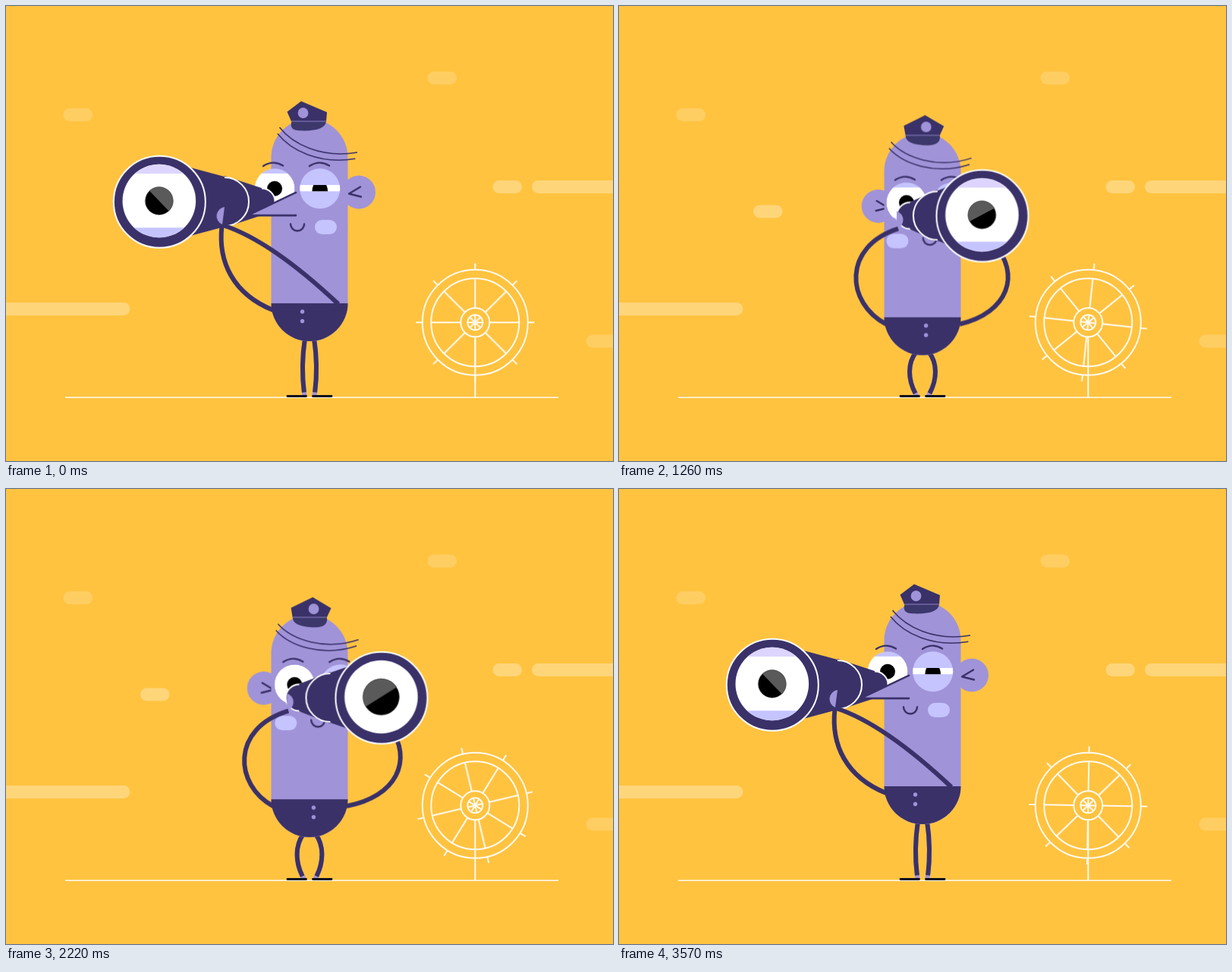
Animation, 800 px wide and 600 px high, one loop 3.6 s. Source, as an HTML page without scripts:

```html
<!DOCTYPE html>
<html lang="en">
<head>
<meta charset="utf-8">
<title>Lookout</title>
<style>
html, body { margin: 0; width: 100%; height: 100%; overflow: hidden; background: #ffc340; }
svg { display: block; width: 100vw; height: 100vh; }

:root { --ease: cubic-bezier(.333, 0, .667, 1); }
.skin { fill: #a093d8; }
.dark { fill: #3a3169; }
.lilac { fill: #c5c4ff; }
.pale { fill: #ddd5ff; }
.white { fill: #fff; }
.line { fill: none; stroke: #3a3169; stroke-width: 2.4; }
.hair { stroke-width: 1.5; }
.limb { fill: none; stroke: #3a3169; stroke-width: 6; }
.rim { fill: #3a3169; stroke: #fff; stroke-width: 2; }
.chalk { fill: none; stroke: #fffaf0; stroke-width: 2; }

/* Head turn: left at 0, right at half time, then back */
.turn { animation: turn 3.6s var(--ease) infinite; }
.morph { d: var(--a); animation: morph 3.6s var(--ease) infinite; }
.sweep { d: var(--a); animation: sweep 3.6s infinite; }
.carry { animation: carry 3.6s infinite; }
.glint { animation: glint 3.6s var(--ease) infinite; }
@keyframes turn {
  0%, 98.9%, 100% { transform: translateX(0); }
  48.9%, 49.7% { transform: translateX(var(--dx)); }
}
@keyframes morph {
  0%, 98.9%, 100% { d: var(--a); }
  48.9%, 49.7% { d: var(--b); }
}
/* The two halves of the same ease, through a middle pose */
@keyframes sweep {
  0%, 98.9%, 100% { d: var(--a); animation-timing-function: cubic-bezier(.333, 0, .667, .5); }
  24.45%, 74.3% { d: var(--m); animation-timing-function: cubic-bezier(.333, .5, .667, 1); }
  48.9%, 49.7% { d: var(--b); animation-timing-function: cubic-bezier(.333, 0, .667, .5); }
}
@keyframes carry {
  0%, 98.9%, 100% { transform: var(--a); animation-timing-function: cubic-bezier(.333, 0, .667, .5); }
  24.45%, 74.3% { transform: var(--m); animation-timing-function: cubic-bezier(.333, .5, .667, 1); }
  48.9%, 49.7% { transform: var(--b); animation-timing-function: cubic-bezier(.333, 0, .667, .5); }
}
@keyframes glint {
  0%, 98.9%, 100% { transform: rotate(46deg); }
  48.9%, 49.7% { transform: rotate(-46deg); }
}

/* Knee bend, twice per loop */
.dip { animation: dip 1.8s -10ms var(--ease) infinite; }
.leg { d: var(--a); animation: bend 1.8s -10ms var(--ease) infinite; }
@keyframes dip { 0%, 97.8%, 100% { transform: translateY(0); } 47% { transform: translateY(33.4px); } }
@keyframes bend { 0%, 97.8%, 100% { d: var(--a); } 47% { d: var(--b); } }

/* Wide-eyed moment on the right */
.lid { animation: lid 3.6s var(--ease) infinite; }
.pupil { animation: pupil 3.6s var(--ease) infinite; }
@keyframes lid {
  0%, 45%, 80%, 100% { transform: translateY(0); }
  55%, 72% { transform: translateY(var(--open)); }
}
@keyframes pupil {
  0%, 45%, 85%, 100% { transform: scale(1); }
  55%, 77% { transform: scale(1.3); }
}

.wheel { animation: wheel 3.6s var(--ease) infinite; }
@keyframes wheel { to { transform: rotate(181deg); } }

.nose {
  fill: #a093d8; stroke: #3a3169; stroke-width: 2.4; stroke-linejoin: round; stroke-linecap: round;
  --a: path("M382 246L319 276L382 276");
  --m: path("M408 246L424 276L408 276");
  --b: path("M418 246L480 276L418 276");
}
.near-left { animation: near-left 3.6s step-end infinite; }
.near-right { animation: near-right 3.6s step-end infinite; }
@keyframes near-left { 0%, 84% { opacity: 1; } 15.5% { opacity: 0; } }
@keyframes near-right { 0%, 85% { opacity: 0; } 14% { opacity: 1; } }
</style>
</head>
<body>
<svg viewBox="0 0 800 600">
  <defs>
    <clipPath id="body-clip"><rect x="349.500" y="149" width="101" height="293" rx="50.500"/></clipPath>
    <clipPath id="lens-clip"><circle r="48.300"/></clipPath>
    <clipPath id="eye-clip"><circle r="26.500"/></clipPath>
    <path id="spoke" d="M0-78V-69.500M0-58V-19M0-10V10M0 19V58M0 69.500V78"/>
    <path id="brow" class="line" d="M0 211Q13 202.500 26 210.500" stroke-linecap="round"/>
    <rect id="cheek" class="lilac" x="-14.500" y="282" width="29" height="19" rx="9.500"/>
    <g id="ear">
      <circle class="skin" r="22"/>
      <path class="line" d="M2-7L-13 2L3 6" stroke-linecap="round" stroke-linejoin="round"/>
    </g>
  </defs>

  <rect width="800" height="600" fill="#ffc340"/>
  <g class="white" opacity=".18">
    <rect x="75.500" y="135" width="38.500" height="17" rx="8.500"/>
    <rect x="555.500" y="86.500" width="38.500" height="17" rx="8.500"/>
    <rect x="764.500" y="433.500" width="60" height="17" rx="8.500"/>
  </g>
  <g class="white" opacity=".3">
    <rect x="641.500" y="230" width="38.500" height="17" rx="8.500"/>
    <rect x="693" y="230" width="130" height="17" rx="8.500"/>
    <rect x="177" y="262.500" width="38.500" height="17" rx="8.500"/>
    <rect x="-20" y="391" width="183.500" height="17" rx="8.500"/>
  </g>

  <g class="chalk">
    <path d="M78 516.200H728" style="stroke-width:1.500"/>
    <path d="M618.300 436V516"/>
    <g transform="translate(618.300 417.300)">
      <circle r="69.500"/><circle r="58"/><circle r="19"/><circle r="10"/>
      <g class="wheel">
        <use href="#spoke"/>
        <use href="#spoke" transform="rotate(45)"/>
        <use href="#spoke" transform="rotate(90)"/>
        <use href="#spoke" transform="rotate(135)"/>
      </g>
    </g>
  </g>

  <!-- Legs: skin shows at the ankle -->
  <g class="limb">
    <g style='--a:path("M394 438C390 465 390 490 393.500 514");--b:path("M390 471C371 477 373 498 391.500 514")'>
      <path class="leg" stroke="#a093d8"/>
      <path class="leg" pathLength="100" stroke-dasharray="94 100"/>
    </g>
    <g style='--a:path("M406 438C410 465 410 490 406.500 514");--b:path("M410 471C429 477 427 498 408.500 514")'>
      <path class="leg" stroke="#a093d8"/>
      <path class="leg" pathLength="100" stroke-dasharray="94 100"/>
    </g>
  </g>
  <path d="M371 514.500H395.500M404.500 514.500H429" stroke="#0c0a1c" stroke-width="2.800" stroke-linecap="round"/>

  <g class="dip">
    <g class="turn" style="--dx:-40px"><use href="#ear" x="465" y="245.500"/></g>
    <g class="turn" style="--dx:-42px"><use href="#ear" transform="translate(375.500 245.500) scale(-1 1)"/></g>

    <rect class="skin" x="349.500" y="149" width="101" height="293" rx="50.500"/>
    <path class="dark" d="M349.500 392h101a50.500 50 0 0 1-101 0z"/>
    <g class="skin turn" style="--dx:17.500px">
      <circle cx="390.500" cy="403" r="2.700"/><circle cx="390.500" cy="415.500" r="2.700"/>
    </g>
    <g clip-path="url(#body-clip)">
      <g class="turn" style="--dx:54px"><use href="#cheek" x="421.500"/></g>
      <g class="turn" style="--dx:41px"><use href="#cheek" x="334"/></g>
    </g>

    <!-- Eyes, brows, mouth -->
    <g class="turn" style="--dx:31px">
      <g transform="translate(354 240.800)">
        <g clip-path="url(#eye-clip)">
          <circle class="white" r="26.500"/>
          <rect class="lilac lid" x="-30" y="-40" width="60" height="20" style="--open:-9px"/>
          <rect class="lilac lid" x="-30" y="20" width="60" height="20" style="--open:9px"/>
          <circle r="10"/>
        </g>
      </g>
      <use href="#brow" x="339"/>
      <use href="#brow" x="400"/>
    </g>
    <g class="turn" style="--dx:32px">
      <g transform="translate(413.700 240.800)">
        <circle class="lilac" r="26.500"/>
        <g clip-path="url(#eye-clip)">
          <path class="white" d="M-30-4.800H30V3.500H-30z"/>
          <path d="M-8.500-4.800H8.500Q10.300-1 10.300 3.500H-10.300Q-10.300-1-8.500-4.800z"/>
        </g>
      </g>
      <path class="line" d="M375 287.500a9 9 0 0 0 18 0" stroke-linecap="round"/>
    </g>

    <!-- Hair and cap -->
    <g style='--a:path("M360.500 160C378 182 415 201 463 193");--b:path("M358 161C376 181 420 196 465 179.500")'>
      <path class="line hair morph"/>
      <g transform="translate(-2.600 8.300)"><path class="line hair morph"/></g>
    </g>
    <path class="morph" fill="#3d386b" style='--a:path("M376.500 152C374 160 377 164 388 164.300C410 165 421 161 422 152Z");--b:path("M378 152C378.500 161 390 165 411 165.500C421 165.500 425 160 423 152Z")'/>
    <path class="morph dark" style='--a:path("M376 152L370.500 139.500L389 125.500L423 140L422 152Z");--b:path("M378 152L376.500 139.500L407 125.500L429.500 140L423 152Z")'/>
    <path d="M376.500 152H422.500" stroke="#a093d8" stroke-width=".8"/>
    <circle class="skin turn" cx="391.500" cy="141" r="6.900" style="--dx:16.500px"/>

    <path class="nose sweep"/>

    <!-- Telescope tubes -->
    <circle class="rim turn" cx="337" cy="258" r="17.500" style="--dx:58px"/>
    <path class="dark morph" style='--a:path("M337 240L288 224L288 292L337 276Z");--b:path("M395 240L452 224L452 292L395 276Z")'/>
    <circle class="rim turn" cx="288" cy="258" r="32" style="--dx:164px"/>
    <path class="dark morph" style='--a:path("M288 225L202 202L202 314L288 291Z");--b:path("M452 225L546 202L546 314L452 291Z")'/>

    <!-- Hands and arms -->
    <g class="carry" style="--a:translate(286px,289px);--m:translate(412px,287px);--b:translate(546px,300px)">
      <path class="skin" d="M2-24a12 12 0 0 0-3 23z"/>
    </g>
    <g class="near-right">
      <g class="carry" style="--a:translate(284px,290px);--m:translate(340px,274px);--b:translate(386px,276px)">
        <path class="skin" d="M-2-23a12 12 0 0 1 0 23z"/>
      </g>
    </g>
    <g class="limb">
      <path class="sweep" style='--a:path("M284.500 290C279 338 300 380 352 401");--m:path("M340 274C285 300 285 370 352 401");--b:path("M386 276C300 298 308 375 352 401")'/>
      <path class="sweep" style='--a:path("M286 289C332 304 387 345 438 393");--m:path("M412 287C484 292 510 365 449 401");--b:path("M546 300C560 362 516 399 449 401")'/>
    </g>

    <!-- Front lens -->
    <g class="turn" style="--dx:344px">
      <circle class="rim" cx="202.300" cy="258.200" r="60.500"/>
      <g transform="translate(201.800 257)">
        <circle class="white" r="48.300"/>
        <g clip-path="url(#lens-clip)">
          <rect class="pale lid" x="-50" y="-66" width="100" height="30" style="--open:-13px"/>
          <rect class="lilac lid" x="-50" y="35.300" width="100" height="30" style="--open:15px"/>
        </g>
        <g class="pupil">
          <circle r="18.500"/>
          <path class="glint" fill="#5a5a5a" d="M-18.500 0a18.500 18.500 0 0 1 37 0z"/>
        </g>
      </g>
    </g>

    <g class="near-left"><path class="nose sweep"/></g>
  </g>
</svg>
</body>
</html>
```
